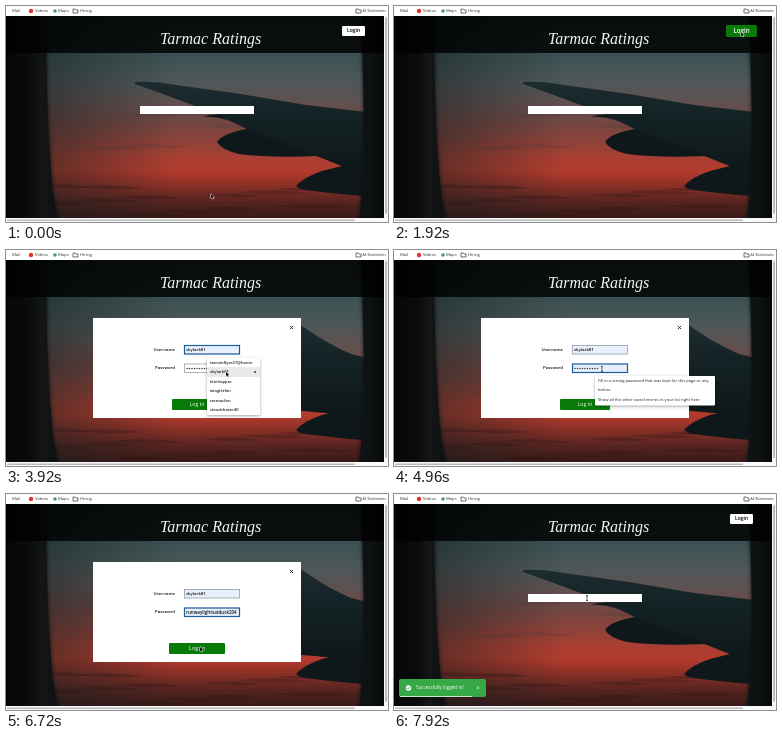
An HTML page with a canvas for the animation above (8000 ms loop, 382 by 216 pixels).

```html
<!DOCTYPE html>
<html lang="en">
<head>
<meta charset="utf-8">
<title>Flight review site login</title>
<style>
html, body { margin: 0; width: 100%; height: 100%; overflow: hidden; background: #000; }
canvas { display: block; width: 382px; height: 216px; }
</style>
</head>
<body>
<canvas id="stage" width="382" height="216"></canvas>
<script>
const c = document.getElementById('stage').getContext('2d');
const LOOP = 8000, STEP = 80;
const SANS = '"Open Sans", "Noto Sans", sans-serif';

// Cursor stops: time, x, y
const PATH = [
  [0, 205, 188], [320, 212, 178], [960, 293, 70], [1440, 347, 26], [2240, 347, 26],
  [2960, 207, 99], [3280, 207, 99], [3760, 220, 122], [4080, 220, 122],
  [4560, 208, 118], [5040, 208, 118], [5360, 224, 131], [5680, 224, 131],
  [6320, 194, 153], [7120, 194, 153], [7520, 193, 103], [8000, 193, 103]
];
const LOGINS = ['tamsinflyer27@home', 'skylark81', 'kitehopper', 'wingletfan', 'tarmacfan', 'cloudchaser40'];

const ease = p => p * p * (3 - 2 * p);
const between = (t, a, b) => t >= a && t < b;

function rect(x, y, w, h, fill, r = 0) {
  c.fillStyle = fill;
  c.beginPath();
  c.roundRect(x, y, w, h, r);
  c.fill();
}

function dot(x, y, r, fill) {
  c.fillStyle = fill;
  c.beginPath();
  c.arc(x, y, r, 0, 7);
  c.fill();
}

function text(s, x, y, size, fill = '#222', align = 'left', weight = 400) {
  c.font = `${weight} ${size}px ${SANS}`;
  c.textAlign = align;
  c.textBaseline = 'middle';
  c.fillStyle = fill;
  c.fillText(s, x, y);
}

function shape(d, fill) {
  c.fillStyle = fill;
  c.fill(new Path2D(d));
}

function line(d, color, width = 0.7) {
  c.strokeStyle = color;
  c.lineWidth = width;
  c.stroke(new Path2D(d));
}

function cross(x, y, r, color) {
  line(`M${x - r} ${y - r}L${x + r} ${y + r}M${x + r} ${y - r}L${x - r} ${y + r}`, color, 0.9);
}

function gradient(x0, y0, x1, y1, stops) {
  const g = c.createLinearGradient(x0, y0, x1, y1);
  stops.forEach(([p, color]) => g.addColorStop(p, color));
  return g;
}

function clouds(n, y0, dy, color) {
  for (let i = 0; i < n; i++) {
    const x = 60 + (i * 83) % 290, y = y0 + (i * 11) % dy, w = 24 + (i * 13) % 22;
    shape(`M${x - w} ${y}Q${x} ${y - 4} ${x + w} ${y + 1}Q${x} ${y + 4} ${x - w} ${y}Z`, color);
  }
}

function photo(modal) {
  rect(0, 10, 378, 202, gradient(0, 10, 0, 212, [
    [0, '#2b4444'], [0.18, '#3a5153'], [0.32, '#4d5758'], [0.42, '#5f5151'],
    [0.52, '#704743'], [0.62, '#8d4239'], [0.7, '#a93f33'], [0.77, '#b23b2d'],
    [0.84, '#8a3027'], [0.92, '#572420'], [1, '#381a18']
  ]));
  rect(40, 10, 130, 202, gradient(40, 0, 170, 0, [[0, 'rgba(22,30,30,.5)'], [1, 'rgba(22,30,30,0)']]));
  clouds(9, 98, 46, 'rgba(70,55,56,.22)');
  clouds(12, 180, 30, 'rgba(42,20,20,.3)');

  const dark = '#0e1719';
  shape('M211 136Q217 127 241 123L378 122V164L336 160L312 150Q265 152 233 148Q216 144 211 136Z', dark);
  shape('M290 180Q298 171 316 165L336 160H378V190L356 190Q320 187 294 183Z', dark);
  shape('M197 111Q206 107 230 109L241 123Q217 109 197 111Z', dark);
  const wing = gradient(0, 75, 0, 165, [[0, '#1d2c30'], [0.4, '#142225'], [1, '#0e1719']]);
  if (modal) shape('M285 69L302 80Q322 94 345 104L378 112V168L285 160Z', wing);
  else shape('M129 76Q150 75 170 79L235 88L300 99L378 108V164L336 160L241 123L212 109Q180 96 129 78Z', wing);

  c.save();
  c.shadowColor = '#0b0e0f';
  c.shadowBlur = 4;
  shape('M0 10H40Q40 100 45 165Q47 195 52 212H0Z',
    gradient(0, 0, 50, 0, [[0, '#060708'], [0.45, '#090b0b'], [0.7, '#131516'], [1, '#0e1112']]));
  shape('M355 10Q357 60 358 120Q358 175 353 212H378V10Z',
    gradient(353, 0, 378, 0, [[0, '#101416'], [0.5, '#0d1011'], [1, '#060708']]));
  c.restore();
}

function browser() {
  rect(0, 0, 382, 10, '#fff');
  const ink = '#333';
  text('Mail', 6, 5, 4.2, ink);
  dot(25, 5, 2.2, '#e3342c');
  text('Videos', 29, 5, 4.2, ink);
  dot(49, 5, 1.8, '#4c9a60');
  text('Maps', 52, 5, 4.2, ink);
  for (const x of [67, 350]) line(`M${x} 3H${x + 2}L${x + 3} 4H${x + 5}V7H${x}Z`, '#333');
  text('Hiring', 74, 5, 4.2, ink);
  text('All Bookmarks', 356.5, 5, 3.5, ink);
  rect(378, 10, 4, 206, '#f7f7f7');
  rect(379.2, 11, 1.8, 197, '#b5b5b5', 1);
  rect(0, 212, 382, 4, '#fafafa');
  rect(1, 213.4, 348, 1.7, '#b9b9b9', 1);
}

function header(t, modal) {
  rect(0, 10, 378, 37, 'rgba(0,0,0,.82)');
  c.font = 'italic 16px "Liberation Serif", serif';
  c.textAlign = 'center';
  c.textBaseline = 'alphabetic';
  c.fillStyle = '#f4f4f4';
  c.fillText('Tarmac Ratings', 204.5, 38);
  if (modal) return;
  if (between(t, 1360, 2240)) {
    rect(332, 19, 31, 12, '#087a08', 1.5);
    text('Login', 347.5, 25.2, 6.2, '#fff', 'center', 600);
  } else {
    rect(336, 20, 23, 10, '#fff', 1.2);
    text('Login', 347.5, 25, 5, '#000', 'center', 600);
  }
}

function field(y, filled, focus) {
  rect(178, y, 56, 9.5, filled ? '#e8f0fe' : '#fff');
  c.strokeStyle = focus ? '#1d5d9b' : '#8b949c';
  c.lineWidth = focus ? 1.2 : 0.7;
  c.strokeRect(178.5, y + 0.5, 55, 8.5);
}

function popup(x, y, w, h) {
  c.save();
  c.shadowColor = 'rgba(0,0,0,.35)';
  c.shadowBlur = 3;
  c.shadowOffsetY = 1;
  rect(x, y, w, h, '#fff', 1);
  c.restore();
}

function loginBox(t) {
  rect(87, 68, 208, 100, '#fff');
  cross(285.5, 77.5, 1.6, '#222');
  text('Username', 169, 100, 4.3, '#111', 'right', 600);
  text('Password', 169, 118.3, 4.3, '#111', 'right', 600);

  const named = t >= 3520, chosen = t >= 5520;
  field(95, named, between(t, 3040, 4400));
  if (named) text('skylark81', 180, 100, 4.3, '#111', 'left', 600);
  field(113.5, named && t >= 4080, t >= 4480);
  if (chosen) text('runwaylightsatdusk204', 180, 118.5, 4.5, '#111', 'left', 600);
  else if (named) for (let i = 0; i < 10; i++) dot(181 + i * 2.5, 118.5, 0.75, '#333');

  const hot = t >= 6160;
  if (hot) rect(163, 149, 56, 11, '#087a08', 1);
  else rect(166, 149, 50, 11, '#087a08', 1);
  text('Log In', 191, 154.7, hot ? 5.8 : 5.2, '#fff', 'center');

  if (between(t, 3200, 4080)) {
    popup(201, 108, 53, 57);
    if (t >= 3520) {
      rect(201, 117, 53, 10, '#e9e9e9');
      cross(249, 122, 1, '#555');
    }
    LOGINS.forEach((s, i) => text(s, 204, 112.5 + i * 9.5, 4.1, '#222', 'left', 600));
  }
  if (between(t, 4560, 5520)) {
    popup(201, 126, 120, 29.5);
    if (t >= 5280) rect(201, 127, 120, 17, '#e9e9e9');
    text('Fill in a strong password that was kept for this page or any', 204, 131, 4.1);
    text('before', 204, 140, 4.1);
    text('Show all the other saved entries in your list right here', 204, 150, 4.1);
  }
}

function toast(t) {
  const p = Math.min(1, (t - 7280) / 400);
  c.save();
  c.translate(-98 * (1 - p) ** 3, 0);
  rect(5, 185, 87, 18, '#36a846', 2);
  dot(14.5, 194, 2.7, '#fff');
  line('M13.2 194L14.2 195L16 192.8', '#36a846', 0.8);
  text('Successfully logged in!', 22, 194, 4.6, '#fff');
  cross(84, 193.8, 1.2, '#b5dfba');
  rect(6, 202, 86 - (t - 7280) / 45, 1, '#c6e9c9');
  c.restore();
}

function cursor(t) {
  const i = Math.max(1, PATH.findIndex(k => k[0] > t));
  const [t0, x0, y0] = PATH[i - 1], [t1, x1, y1] = PATH[i];
  const p = ease((t - t0) / (t1 - t0));
  c.save();
  c.translate(x0 + (x1 - x0) * p, y0 + (y1 - y0) * p);
  if (between(t, 2960, 3360) || between(t, 4560, 5120) || t >= 7520) {
    line('M-1 -1.5H1M0 -1.5V3.5M-1 3.5H1', '#222');
  } else {
    const d = 'M0 0V4.2L1 3.3L1.8 5L2.6 4.6L1.9 3H3.2Z';
    line(d, '#fff', 1);
    shape(d, '#000');
  }
  c.restore();
}

function draw(t) {
  const modal = between(t, 2240, 7200);
  c.clearRect(0, 0, 382, 216);
  photo(modal);
  header(t, modal);
  browser();
  if (modal) loginBox(t);
  else rect(134, 100, 114, 8, '#fff');
  if (t >= 7280) toast(t);
  cursor(t);
}

const start = performance.now();
function tick() {
  const t = (performance.now() - start) % LOOP;
  draw(Math.floor(t / STEP) * STEP);
  requestAnimationFrame(tick);
}
tick();
</script>
</body>
</html>
```
